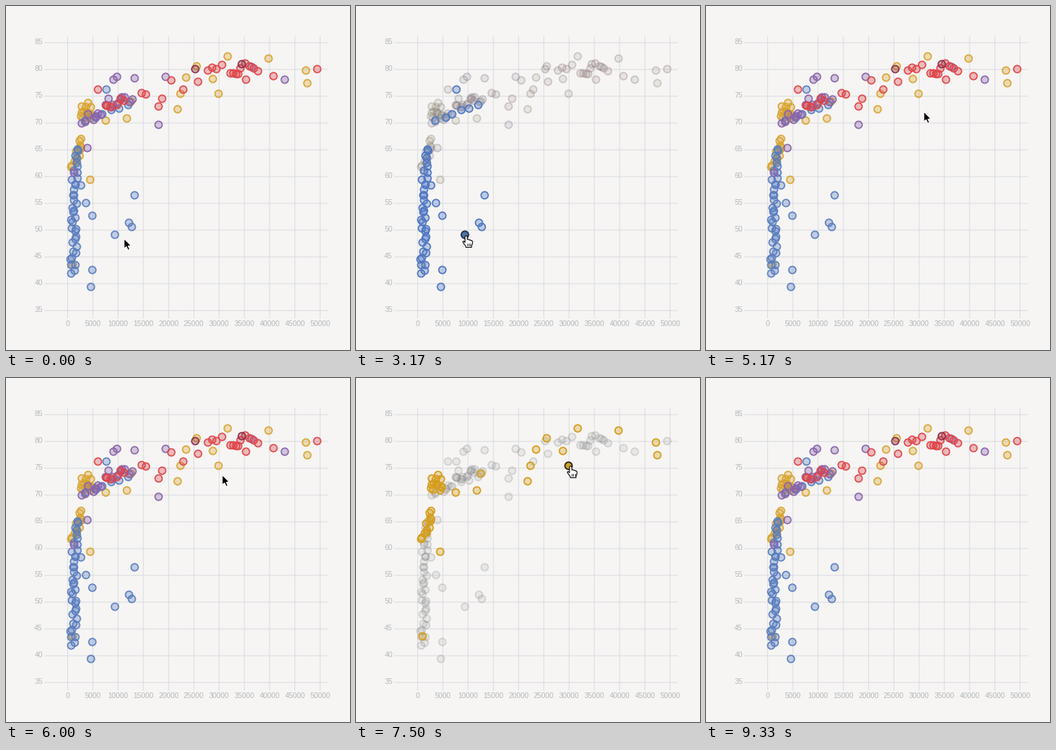
Recreate the animation shown at these times as a matplotlib script. Size 488 by 488 pixels, loop 9490 ms.

```python
import numpy as np
import matplotlib.pyplot as plt
from matplotlib.animation import FuncAnimation
from matplotlib.colors import to_rgb
from matplotlib.patches import Polygon

SIZE, DPI = 488, 100
PX = 72 / DPI                 # points per pixel
FRAMES, STEP = 146, 65        # 9490 ms per loop
FADE = 1000
GREY = np.array(to_rgb("#868686"))
rng = np.random.default_rng(4)


def cloud(n, start, end, spread):
    """n points along a line, scattered evenly around it."""
    line = np.linspace(start, end, n)
    return line + rng.uniform(-1, 1, (n, 2)) * spread


def group(keys, *clouds):
    return np.vstack([keys, *clouds])


# the first key point of blue and yellow is the one that gets hovered
blue = group([(153.6, 323.7), (181.7, 267.5), (174, 306.7), (177.5, 313),
              (121.7, 296.5), (121.6, 374), (119.6, 397.5), (113.2, 278.5),
              (106, 253.6), (142.2, 117.7)],
             cloud(38, (97, 203), (94.5, 379), (5, 3)),
             cloud(6, (115, 160), (173, 139), (3, 5)))
yellow = group([(301, 124), (314, 71), (372, 73.8), (425.2, 91), (426.5, 109),
                (270.2, 85.2), (254.6, 101.2), (293.2, 103), (247.3, 124),
                (242.5, 145.7), (176.5, 134.6), (170.6, 159.3), (140.7, 161.8),
                (119.3, 246), (94.3, 365.6)],
               cloud(12, (95, 230), (108, 189), (4, 3)),
               cloud(13, (105, 148), (122, 147), (1, 13)))
purple = group([(151.7, 103.7), (156.5, 99.8), (181.7, 101.8), (225.7, 100.2),
                (395, 104), (347.5, 86), (216.2, 168), (114.7, 200.7),
                (95.7, 236)],
               cloud(17, (109, 156), (178, 126), (3, 11)))
red = group([(129.8, 117.8), (192.2, 123), (197.6, 124.7), (216.2, 141.6),
             (221.3, 131.2), (234.4, 105), (250.8, 117.5), (271.7, 106.7),
             (340, 103.5), (378.8, 99.3), (441, 89.2)],
            cloud(6, (140, 138), (165, 141), (2, 10)),
            cloud(4, (285, 92), (306, 85), (1, 3)),
            cloud(4, (318, 95.5), (329, 95.5), (1, .5)),
            cloud(5, (331, 85), (356, 85), (2, 8)))
maroon = group([(267.7, 89.2), (334, 81.6)])

# points, resting colour, highlighted colour, (hover start, hover end)
GROUPS = [(yellow, "#d8a32f", "#d59d1c", (6200, 8170)),
          (blue, "#587cbf", "#4d76c3", (2500, 3900)),
          (purple, "#8862aa", "#8862aa", None),
          (red, "#de4447", "#de4447", None),
          (maroon, "#8a2844", "#8a2844", None)]

# time, x, y of the cursor tip
PATH = np.array([(0, 167.5, 330), (2333, 167.5, 330), (2500, 156.3, 326),
                 (3833, 156.3, 326), (5000, 309, 150), (5800, 309, 150),
                 (6200, 304.5, 125), (8167, 304.5, 125), (9000, 318, 445)])
ARROW = 1.12 * np.array([(0, 0), (0, 12.6), (2.9, 10.1), (5, 14.6),
                         (7.2, 13.6), (5.2, 9.3), (9, 9)])
HAND = np.array([(-1.6, 1.2), (-.6, 0), (.6, 0), (1.6, 1.2), (1.6, 5.4),
                 (3.1, 5), (4.2, 6), (5.5, 5.6), (6.6, 6.8), (7.8, 6.6),
                 (9, 8), (9, 11), (7.6, 14), (7.6, 16.4), (-.4, 16.4),
                 (-.4, 15), (-3, 11.6), (-4.8, 8.8), (-4.1, 7.6),
                 (-2.8, 8), (-1.6, 9.6)])
FOLDS = (1.7, 3.9, 6.1)

fig = plt.figure(figsize=(SIZE / DPI, SIZE / DPI), dpi=DPI, facecolor="#f6f5f4")
ax = fig.add_axes([0, 0, 1, 1])
ax.set(xlim=(0, SIZE), ylim=(SIZE, 0))
ax.axis("off")


def label(x, y, text, align):
    ax.text(x, y, text, ha=align, va="center_baseline", color="#b6b8ba",
            family="Liberation Sans", size=10.5 * PX)


def draw_grid():
    style = dict(color="#dadbdf", lw=PX, zorder=0, snap=False)
    for k in range(11):
        x, y = 87.4 + 35.82 * k, 52 + 38 * k
        ax.plot([x, x], [43, 443], **style)
        ax.plot([55, 456], [y, y], **style)
        label(x, 450.3, str(5000 * k), "center")
        label(52, y - 2.2, str(85 - 5 * k), "right")


def dots(points, z, **kw):
    x, y = points.T
    return ax.scatter(x, y, s=(10.2 * PX) ** 2, lw=1.8 * PX, zorder=z, **kw)


def ease(u):
    u = min(max(u, 0), 1)
    return 4 * u ** 3 if u < .5 else 1 - 4 * (1 - u) ** 3


def level(t, span):
    if span is None:
        return 0
    start, end = span
    return ease((t - start) / FADE) - ease((t - end) / FADE)


def mix(a, b, u):
    return a + (b - a) * u


def paint(art, color, edge_alpha, fill_alpha):
    art.set_edgecolor((*color, edge_alpha))
    art.set_facecolor((*color, fill_alpha))


def cursor_at(t):
    i = min(np.searchsorted(PATH[:, 0], t, side="right") - 1, len(PATH) - 2)
    (t0, *a), (t1, *b) = PATH[i], PATH[i + 1]
    u = min((t - t0) / (t1 - t0), 1)
    return mix(np.array(a), np.array(b), u * u * (3 - 2 * u))


draw_grid()
layers = [dots(g[0], 2 + i) for i, g in enumerate(GROUPS)]
hovered = {
    0: dots(yellow[:1], 10, facecolor="#cf9d33", edgecolor="#2b2618"),
    1: dots(blue[:1], 10, facecolor="#5073a6", edgecolor="#24324a"),
}
arrow = Polygon(ARROW, fc="black", ec="white", lw=1.1 * PX, zorder=20)
hand = Polygon(HAND, fc="white", ec="black", lw=1.1 * PX, zorder=20)
ax.add_patch(arrow)
ax.add_patch(hand)
folds = [ax.plot([], [], color="black", lw=.8 * PX, zorder=21)[0]
         for _ in FOLDS]


def update(i):
    t = int((i * STEP + 52) * 6 / 1000) * 1000 / 6    # six pictures a second
    levels = [level(t, g[3]) for g in GROUPS]
    total = min(sum(levels), 1)
    for k, (_, rest, strong, _) in enumerate(GROUPS):
        base, lit = np.array(to_rgb(rest)), levels[k]
        dim = total - lit
        color = mix(mix(base, np.array(to_rgb(strong)), lit), GREY, dim)
        paint(layers[k], color, .93 + .07 * lit - .65 * dim, .33 - .21 * dim)
        layers[k].set_zorder(8 if lit > .02 else 2 + k)

    over = False
    for k, art in hovered.items():
        start, end = GROUPS[k][3]
        on = start <= t < end
        art.set_visible(on)
        over = over or on

    pos = cursor_at(t)
    arrow.set_xy(ARROW + pos)
    hand.set_xy(HAND + pos)
    arrow.set_visible(not over and t < 9100)
    hand.set_visible(over)
    for line, x in zip(folds, FOLDS):
        line.set_data([pos[0] + x] * 2, [pos[1] + 10.5, pos[1] + 14.1])
        line.set_visible(over)
    return [*layers, *hovered.values(), arrow, hand, *folds]


anim = FuncAnimation(fig, update, frames=FRAMES, interval=STEP,
                     init_func=lambda: update(0), repeat=True, repeat_delay=0)
plt.show()
```
